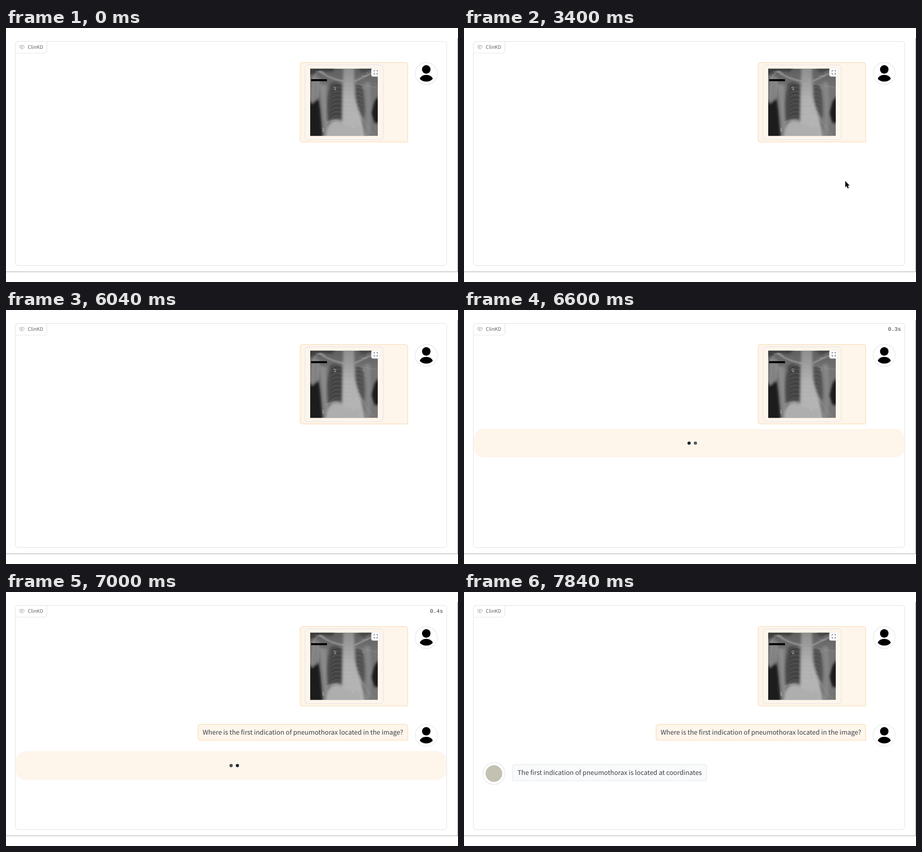
Animation, 997 px wide and 561 px high, one loop 8 s. Source, as an HTML page:

```html
<!DOCTYPE html>
<html lang="en">
<head>
<meta charset="utf-8">
<title>Chat demo</title>
<style>
  html, body { margin: 0; width: 100%; height: 100%; overflow: hidden; background: #fff; }
  svg { display: block; width: 100vw; height: 100vh; }
  text { font-family: "Noto Sans CJK SC", "Noto Sans CJK JP", "Open Sans", sans-serif; fill: #3c4046; white-space: pre; text-rendering: geometricPrecision; }
  .msg { font-size: 14.24px; }
  .label { font-size: 10.8px; fill: #5b5f67; }
  .timer { font: 12px "Liberation Mono", "DejaVu Sans Mono", monospace; fill: #33373d; text-anchor: end; }
  .edge { fill: none; stroke: #e4e4e7; stroke-width: 1.2; }
  .user { fill: #fef5eb; stroke: #f7dbb0; stroke-width: 1.2; }
  .bot { fill: #f9fafb; stroke: #e4e6ea; stroke-width: 1.1; }
  .ring { fill: #fff; stroke: #e4e4e7; stroke-width: 1.1; }
</style>
</head>
<body>
<svg viewBox="0 0 997 561" preserveAspectRatio="none">
  <defs>
    <clipPath id="scanClip"><rect width="149" height="148.5"/></clipPath>
    <clipPath id="faceClip"><rect id="faceRows" x="40" y="380" width="52" height="0"/></clipPath>
    <filter id="soft" x="-30%" y="-30%" width="160%" height="160%"><feGaussianBlur stdDeviation="2.8"/></filter>
    <filter id="fine" x="-30%" y="-30%" width="160%" height="160%"><feGaussianBlur stdDeviation=".8"/></filter>
    <filter id="drop" x="-50%" y="-50%" width="200%" height="200%">
      <feDropShadow dx="0" dy="1" stdDeviation="1" flood-opacity=".35"/>
    </filter>
    <linearGradient id="tone" x1="0" y1="0" x2="0" y2="1">
      <stop offset="0" stop-color="#5e5e5e"/><stop offset=".3" stop-color="#747474"/>
      <stop offset="1" stop-color="#767676"/>
    </linearGradient>
    <linearGradient id="spineTone" x1="0" y1="0" x2="0" y2="1">
      <stop offset="0" stop-color="#8c8c8c"/><stop offset=".45" stop-color="#b0b0b0"/>
      <stop offset="1" stop-color="#b6b6b6"/>
    </linearGradient>
    <g id="person">
      <circle class="ring" r="24.4"/>
      <circle cy="-9" r="9.4"/>
      <path d="M-14.3 11.4C-10 .3 10 .3 14.3 11.4C9 19.8-9 19.8-14.3 11.4Z"/>
    </g>
  </defs>

  <rect width="997" height="561" fill="#fff"/>
  <path d="M996.5 22V538.5" stroke="#8c8c8c"/>
  <path d="M0 538.5H997" stroke="#a2a2a2"/>
  <rect class="edge" x="20.6" y="29.6" width="951.6" height="495" rx="7"/>
  <path class="edge" d="M20.6 55.5H83Q90.2 55.5 90.2 48.5V29.6"/>
  <g fill="none" stroke="#92969e" stroke-width=".8">
    <path d="M32 38.4H38.6Q40 38.4 40 39.8V42.6Q40 44 38.6 44H38L36.6 46.6H34.6M32 38.4Q30 38.4 30 40.4V42.4Q30 44 31.6 44H33.2V46L35.4 44H36"/>
    <path d="M32.4 40.6H37.8M32.4 42.2H36"/>
  </g>
  <text class="label" x="48" y="46.2">ClinKD</text>

  <path class="user" id="scanBubble"/>
  <rect class="edge" x="659.5" y="81.3" width="172.5" height="165.2" rx="7" stroke="#e8e5e1"/>
  <g transform="translate(671 89.7)" clip-path="url(#scanClip)">
    <rect width="149" height="149" fill="url(#tone)"/>
    <g filter="url(#soft)">
      <path d="M-5-5H58L48 7L20 5L-5 16Z" fill="#3c3c3c"/>
      <path d="M104-5H155V12L130 7L112 8Z" fill="#464646"/>
      <path d="M-6 64L6 76L18 62L22 90L28 155H-6Z" fill="#1b1b1b"/>
      <path d="M155 56L142 72L134 98L142 120H155Z" fill="#1a1a1a"/>
      <path d="M3 20Q16 10 22 24L17 66L3 78Z" fill="#828282"/>
      <path d="M20 34Q27 80 33 155H42Q34 90 36 36Z" fill="#8a8a8a"/>
      <path d="M120 30Q126 90 122 150H132Q137 80 132 30Z" fill="#858585"/>
      <path d="M44 34Q55 24 71 36V112Q52 106 38 118Q34 70 44 34Z" fill="#424242"/>
      <path d="M99 36Q110 28 117 46Q124 86 119 112Q110 100 101 74Z" fill="#505050"/>
      <path d="M73-4H97L98 60Q104 90 112 108L120 152H70Z" fill="url(#spineTone)"/>
      <path d="M35 152Q38 115 57 115Q72 116 80 126L112 130V152Z" fill="#aeaeae"/>
    </g>
    <g id="ribs" fill="none" stroke="#d8d8d8" stroke-width="2" opacity=".13" filter="url(#fine)"/>
    <g fill="none" stroke="#c4c4c4" filter="url(#fine)">
      <path d="M20 6Q44 23 74 28M144 6Q118 18 98 28" stroke-width="4" opacity=".4"/>
      <path d="M6 24Q16-2 34 12M124 10Q136-2 146 18" stroke-width="2" opacity=".35"/>
      <path d="M8 26L3 74M18 26L17 72M104 92Q120 122 142 148M98 100Q112 126 126 148M100 34L148 42" opacity=".4"/>
      <path d="M36 120Q42 114 58 114Q70 116 76 122" opacity=".7"/>
    </g>
    <path d="M51 42L54 40L57 43L53 46L57 47M26 131L30 134L27 137L31 139M116 41L119 44M92 132L96 128" fill="none" stroke="#d6d6d6" stroke-width=".9"/>
    <path d="M12 6.5H30M113 16H126" stroke="#c8c8c8" stroke-dasharray="2 1" opacity=".7"/>
    <rect x="2" y="23.3" width="35" height="4.4"/>
  </g>
  <rect x="806" y="88.8" width="18.6" height="18.2" rx="3.5" fill="#fff" stroke="#e7e5e4" stroke-width=".8"/>
  <path d="M811.8 96.4V93.8H814.3M816.9 93.8H819.4V96.4M819.4 99V101.6H816.9M814.3 101.6H811.8V99" fill="none" stroke="#5c606c" stroke-width="1.1"/>
  <use href="#person" x="927" y="100.5"/>

  <g id="question">
    <path class="user" id="questionBubble"/>
    <text class="msg" x="433.8" y="315.2">Where is the first indication of pneumothorax located in the image?</text>
    <use href="#person" x="927" y="316.7"/>
  </g>

  <g id="pending">
    <rect x="21.3" y="-31.7" width="950.6" height="63.2" rx="22" fill="#fef5eb"/>
    <g id="dots" fill="#1c2630">
      <circle cx="482.5" r="3.6"/><circle cx="496.5" r="3.6"/><circle cx="510.4" r="3.6"/>
    </g>
  </g>
  <text class="timer" id="timer" x="964" y="46.3"></text>

  <g id="answer">
    <circle class="ring" cx="66" cy="401" r="24.4"/>
    <circle cx="66" cy="401" r="18.4" fill="#c3c2b2" clip-path="url(#faceClip)"/>
    <path class="bot" id="answerBubble"/>
    <text class="msg" id="reply" x="118" y="404.4"></text>
  </g>

  <path id="cursor" d="M0 0V13.6L3 10.8L5.2 16L7.6 15L5.4 10H9.4Z" stroke="#fff" stroke-width=".9" paint-order="stroke" filter="url(#drop)"/>
</svg>
<script>
const LOOP = 8000, STEP = 40;
const ASK = 6320, SENT = 6640, REPLY = 7040;
const words = "The first indication of pneumothorax is located at coordinates".split(" ");
// [time, words shown]
const typing = [[7040, 1], [7440, 2], [7480, 3], [7520, 4], [7560, 5], [7600, 7], [7800, 8], [7840, 9]];
// [start, end, from, to]
const moves = [
  [1200, 1240, [887, 509], [986, 377]],
  [3400, 3440, [841, 338], [657, 493]],
  [7480, 7560, [905, 521], [974, 278]]
];
const $ = id => document.getElementById(id);
const show = (id, on) => $(id).setAttribute("display", on ? "inline" : "none");

// Rounded bubble with one square lower corner.
function bubble(id, x, y, w, h, square) {
  const r = 6, right = square === "right" ? 0 : r, left = square === "left" ? 0 : r;
  $(id).setAttribute("d", `M${x + r} ${y}h${w - 2 * r}q${r} 0 ${r} ${r}v${h - r - right}` +
    `q0 ${right} ${-right} ${right}H${x + left}q${-left} 0 ${-left} ${-left}V${y + r}q0 ${-r} ${r} ${-r}Z`);
}

function drawRibs() {
  let d = "";
  for (let i = 0; i < 9; i++) {
    const y = 34 + i * 9;
    d += `M72 ${y}Q48 ${y - 8} ${41 - i * .5} ${y + 15}M98 ${y}Q114 ${y - 7} 122 ${y + 14}`;
    d += `M77 ${y}h15`;
  }
  const path = document.createElementNS("http://www.w3.org/2000/svg", "path");
  path.setAttribute("d", d);
  $("ribs").append(path);
}

const ease = u => u * u * (3 - 2 * u);
function flash(phase) {
  const p = ((phase % 1) + 1) % 1;
  return Math.min(1, 1.2 * ease(1 - Math.abs(2 * p - 1)));
}

function drawPending(t) {
  const on = t >= ASK && t < REPLY, sent = t >= SENT;
  show("pending", on);
  show("timer", on);
  if (!on) return;
  const age = (t - (sent ? SENT : ASK)) / 1000;
  const phase = age + (sent ? .667 : .68);
  $("pending").setAttribute("transform", `translate(0 ${sent ? 383.3 : 294})`);
  [...$("dots").children].forEach((dot, i) => dot.setAttribute("opacity", flash(phase - i / 3)));
  $("timer").textContent = age.toFixed(1) + "s";
}

function drawAnswer(t) {
  show("answer", t >= REPLY);
  if (t < REPLY) return;
  const count = typing.filter(([at]) => at <= t).pop()[1];
  $("reply").textContent = words.slice(0, count).join(" ");
  bubble("answerBubble", 107, 381.4, $("reply").getComputedTextLength() + 22, 35.6, "left");
  $("faceRows").setAttribute("height", t < 7240 ? 0 : t < 7440 ? 7 : 42);
}

function drawCursor(t) {
  const move = moves.find(([start, end]) => t >= start && t <= end);
  show("cursor", move);
  if (!move) return;
  const [start, end, from, to] = move, u = (t - start) / (end - start);
  const [x, y] = from.map((v, i) => v + (to[i] - v) * u);
  $("cursor").setAttribute("transform", `translate(${x} ${y})`);
}

function draw(now) {
  const t = Math.floor((now % LOOP) / STEP) * STEP;
  show("question", t >= SENT);
  drawPending(t);
  drawAnswer(t);
  drawCursor(t);
}

function tick() {
  draw(performance.now());
  requestAnimationFrame(tick);
}

drawRibs();
bubble("scanBubble", 648.8, 76.2, 237.3, 175.5, "right");
bubble("questionBubble", 423.6, 292.3, 462.5, 35.2, "right");
tick();
</script>
</body>
</html>
```
